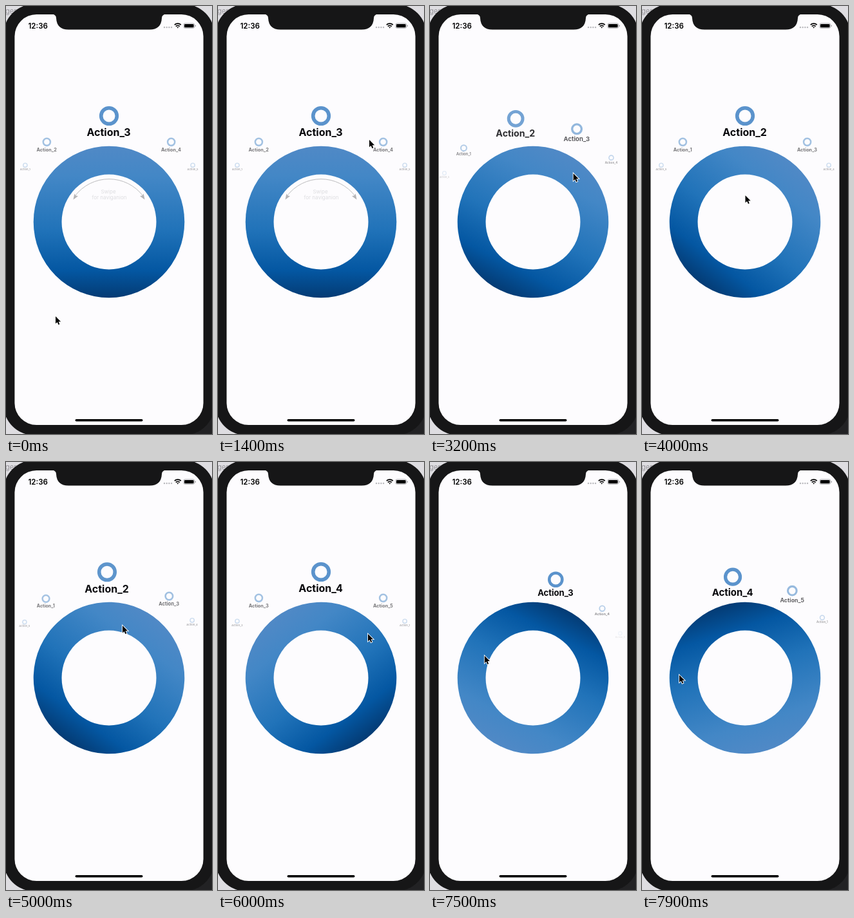
Write an HTML page that moves like this. It is 320x662 px and loops after 8000 ms.

```html
<!DOCTYPE html>
<html lang="en">
<head>
<meta charset="utf-8">
<title>Wheel menu</title>
<style>
html, body { margin: 0; width: 100%; height: 100%; overflow: hidden; background: #dedde1; }
svg { display: block; width: 320px; height: 662px; font-family: Inter, Roboto, sans-serif; }
.label { font-size: 16px; font-weight: 700; text-anchor: middle; fill: #08080c; }
</style>
</head>
<body>
<svg viewBox="0 0 320 662">
  <defs>
    <linearGradient id="blue" x1="0" y1="0" x2="0" y2="1">
      <stop offset="0" stop-color="#5089c6"/>
      <stop offset=".2" stop-color="#4387c6"/>
      <stop offset=".55" stop-color="#2173b9"/>
      <stop offset=".82" stop-color="#0457a2"/>
      <stop offset="1" stop-color="#043b74"/>
    </linearGradient>
  </defs>

  <!-- phone -->
  <text x="-1" y="12" font-size="11" fill="#96959a">ger</text>
  <rect x="270" y="600" width="50" height="62" fill="#222224"/>
  <rect x="-4" y="-3" width="328" height="667" rx="48" fill="#161617"/>
  <rect x="13.400" y="13" width="293.200" height="635" rx="34" fill="#fdfcfe"/>
  <path d="M71 12.500Q78 13 78 19Q79 36.500 97 36.500H223Q241 36.500 242 19Q242 13 249 12.500Z" fill="#161617"/>
  <rect x="107.500" y="639" width="105" height="3.600" rx="1.800"/>

  <!-- status bar -->
  <text x="34.500" y="34.500" font-size="11.500" font-weight="600">12:36</text>
  <path d="M246 33h12" stroke="#b9b9bd" stroke-width="2.400" stroke-linecap="round" stroke-dasharray="0 3.700"/>
  <g fill="none" stroke="#000" stroke-width="1.700">
    <path d="M261.800 29.200a7.300 7.300 0 0 1 10 0M263.800 31.500a4.300 4.300 0 0 1 6 0"/>
    <path d="M265.200 32.500h3.200l-1.600 1.900z" fill="#000" stroke="none"/>
  </g>
  <rect x="275.900" y="26.900" width="16.800" height="7.400" rx="2.200" fill="none" stroke="#9a9a9e" stroke-width=".8"/>
  <rect x="277" y="28" width="14.600" height="5.200" rx="1.300"/>
  <rect x="293.700" y="29.300" width="1.200" height="2.600" rx=".6" fill="#9a9a9e"/>

  <g id="items"></g>
  <circle id="wheel" cx="160" cy="334" r="117.300" fill="url(#blue)"/>
  <circle cx="160" cy="334" r="73.500" fill="#fdfcfe"/>

  <g id="hint">
    <path d="M107 294A66.500 66.500 0 0 1 213 294" fill="none" stroke="#bcbcbe"/>
    <path id="head" d="M104.500 299.500L106.300 290.300L108.100 293.200L112 294Z" fill="#b4b4b6"/>
    <use href="#head" transform="translate(320) scale(-1 1)"/>
    <g font-size="8" fill="#dddde0" text-anchor="middle">
      <text x="159" y="289.500">Swipe</text>
      <text x="160.500" y="299">for naviganion</text>
    </g>
  </g>

  <path id="cursor" d="M0 0V12.800L3 10.100L5.100 14.900L7.200 14L5.200 9.300H9.300Z" stroke="#fff" stroke-width="2" paint-order="stroke"/>
</svg>
<script>
const $ = id => document.getElementById(id);
const clamp = x => Math.min(1, Math.max(0, x));
const progress = (t, start, length) => clamp((t - start) / length);
const easeOut = x => Math.sin(x * Math.PI / 2);
const smooth = x => x * x * (3 - 2 * x);

// Each swipe turns the menu by a number of items.
const swipes = [
  { start: 2400, length: 1600, turn: -1 },
  { start: 4990, length: 1000, turn: 2 },
  { start: 6100, length: 1000, turn: 1 },
  { start: 7100, length: 1000, turn: 4.43 }
];
const turned = t => swipes.reduce((sum, s) => sum + s.turn * easeOut(progress(t, s.start, s.length)), 0);

// Stops of the pointer: time, x, y
const stops = [
  [0, 77, 480], [400, 250, 214], [600, 250, 214], [1000, 112, 225], [1500, 249, 205],
  [2100, 106, 306], [2600, 159.5, 234], [3000, 230, 255], [4000, 160.5, 293], [4400, 160.5, 293],
  [4800, 236, 266], [5000, 181, 253], [5500, 110, 265], [6000, 233, 266], [7000, 122.5, 258], [7900, 58, 329.5]
];

function pointerAt(t) {
  const n = stops.findIndex(stop => stop[0] > t);
  if (n < 0) return stops[stops.length - 1].slice(1);
  const [t0, x0, y0] = stops[n - 1], [t1, x1, y1] = stops[n];
  const k = smooth((t - t0) / (t1 - t0));
  return [x0 + (x1 - x0) * k, y0 + (y1 - y0) * k];
}

const items = [1, 2, 3, 4, 5].map(n => {
  const g = document.createElementNS("http://www.w3.org/2000/svg", "g");
  g.innerHTML = `<circle r="12.300" fill="none" stroke="#5b93cc" stroke-width="5.600"/>
    <text class="label" x="-.4" y="31.400">Action_${n}</text>`;
  $("items").append(g);
  return g;
});

// Items shrink and fade with distance from the top; a fast spin hides those leaving.
function placeItem(g, slot, rush) {
  const u = slot - 5 * Math.round(slot / 5), far = Math.abs(u);
  const degrees = Math.min(30.5 * far + 7.5 * far * far, 20 + 18 * far);
  const angle = Math.sign(u) * degrees * Math.PI / 180;
  const radius = 157 + 7 * Math.max(0, 1 - far) - 5 * rush;
  const scale = .15 + .85 / (1 + 1.8 * far * far);
  const x = 160 + radius * Math.sin(angle), y = 334 - radius * Math.cos(angle);
  let alpha = Math.exp(-.6 * far) * clamp((2.5 - far) * 3);
  if (far < .5) alpha += (1 - alpha) * rush;
  else if (u < 0) alpha *= 1 - rush;
  g.setAttribute("transform", `translate(${x} ${y}) scale(${scale})`);
  g.setAttribute("opacity", alpha);
}

function draw(t) {
  const turn = turned(t), rush = progress(t, 7100, 400);
  items.forEach((g, i) => placeItem(g, i - 2 - turn, rush));
  $("wheel").setAttribute("transform", `rotate(${-turn * (38 - Math.abs(turn))} 160 334)`);
  $("hint").setAttribute("opacity", 1 - progress(t, 2200, 300));
  $("cursor").setAttribute("transform", `translate(${pointerAt(t)}) scale(.88)`);
}

const start = performance.now();
(function frame() {
  draw((performance.now() - start) % 8000);
  requestAnimationFrame(frame);
})();
</script>
</body>
</html>
```
